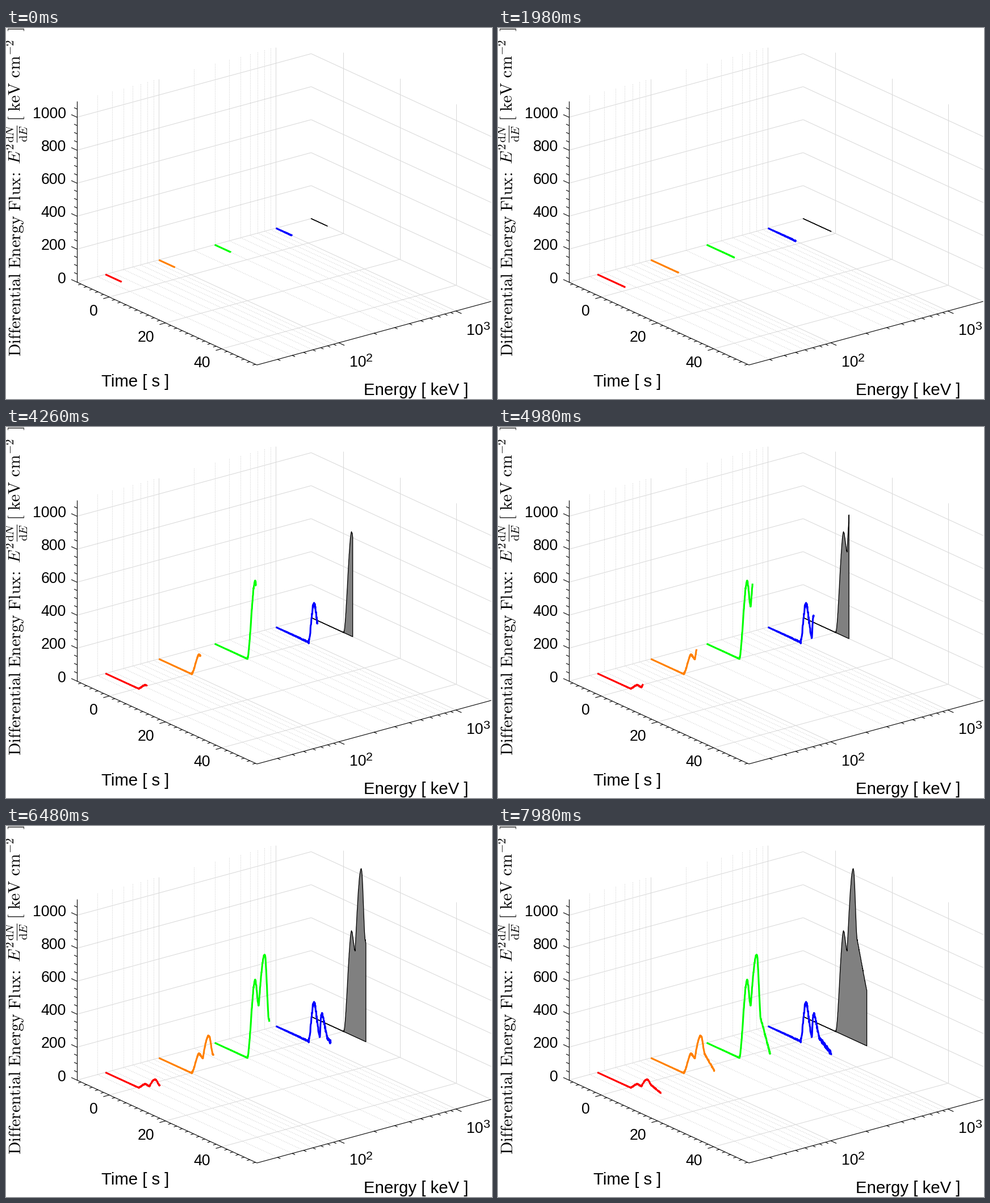
A matplotlib script for the animation above (8 s loop, 856 by 654 pixels).

```python
import numpy as np
import matplotlib.pyplot as plt
from matplotlib.animation import FuncAnimation
from matplotlib.collections import LineCollection
from matplotlib.patches import Polygon

plt.rcParams["font.family"] = "Liberation Sans"
plt.rcParams["mathtext.fontset"] = "cm"

W, H, DPI = 856, 654, 100
PT = 72 / DPI                      # points per pixel
INK, GRID, MINOR = "black", "#d8d8d8", "#c4c4c4"

# Oblique view: screen vectors of the energy and time axes, in pixels
ORIGIN = np.array([125.0, 448.0])
E_VEC = np.array([412.5, -112.0])
T_VEC = np.array([317.0, 146.0])
E_MIN, E_MAX = 20, 2000
T_MIN, T_MAX = -11.5, 52.5
Z_MAX, Z_SCALE = 1098, 0.2907
SLOPE = T_VEC[1] / T_VEC[0]

TIMES = range(0, 41, 20)
FLUXES = range(0, 1001, 200)
DECADES = [100, 1000]
BETWEEN = [m * d for d in (10, 100) for m in range(2, 10) if m * d > E_MIN]

TICK_MS, STEP_MS, LOOP_MS = 20, 60, 8000
STEP_PX, START_PX = 0.628, 28.5    # advance per step and lead at the start


def project(e, t, z=0):
    fe = np.log(e / E_MIN) / np.log(E_MAX / E_MIN)
    ft = (t - T_MIN) / (T_MAX - T_MIN)
    return ORIGIN + fe * E_VEC + ft * T_VEC - np.array([0, z * Z_SCALE])


fig = plt.figure(figsize=(W / DPI, H / DPI), dpi=DPI, facecolor="white")
ax = fig.add_axes([0, 0, 1, 1])
ax.set_xlim(0, W)
ax.set_ylim(H, 0)
ax.axis("off")


def add_lines(segments, color, width=1.0, style="solid"):
    ax.add_collection(LineCollection(
        segments, colors=color, linewidths=width * PT, linestyles=style))


def label(x, y, text, size, ha="center", rotation=0):
    ax.text(x, y, text, fontsize=size * PT, color=INK, ha=ha, va="baseline",
            rotation=rotation, rotation_mode="anchor")


def draw_grid():
    def floor_and_wall(e):
        foot = project(e, T_MIN)
        return [(foot, project(e, T_MIN, Z_MAX)), (foot, project(e, T_MAX))]

    minor = [s for e in BETWEEN for s in floor_and_wall(e)]
    major = [s for e in DECADES for s in floor_and_wall(e)]
    for t in TIMES:
        foot = project(E_MAX, t)
        major += [(foot, project(E_MAX, t, Z_MAX)), (foot, project(E_MIN, t))]
    for z in FLUXES:
        corner = project(E_MAX, T_MIN, z)
        major += [(corner, project(E_MIN, T_MIN, z)),
                  (corner, project(E_MAX, T_MAX, z))]
    add_lines(minor, MINOR, style=(0, (1, 2)))
    add_lines(major, GRID)


def draw_rulers():
    e_dir = E_VEC / np.hypot(*E_VEC)
    t_dir = T_VEC / np.hypot(*T_VEC)
    front = project(E_MIN, T_MAX)
    segs = [(ORIGIN, project(E_MIN, T_MIN, Z_MAX)), (ORIGIN, front),
            (front, project(E_MAX, T_MAX))]

    def tick(p, direction, is_major):
        segs.append((p, p + direction * (11 if is_major else 5.5)))

    for z in range(0, Z_MAX, 50):
        tick(project(E_MIN, T_MIN, z), -t_dir, z in FLUXES)
    for t in range(-10, 53, 2):
        tick(project(E_MIN, t), -e_dir, t in TIMES)
    for e in DECADES + BETWEEN:
        tick(project(e, T_MAX), t_dir, e in DECADES)
    add_lines(segs, INK, 1.1)


def draw_labels():
    size, big, tex = 26.67, 29.33, 29.8
    for z in FLUXES:
        x, y = project(E_MIN, T_MIN, z)
        label(x - 19, y + 1.5, str(z), size, "right")
    for t in TIMES:
        x, y = project(E_MIN, t)
        label(x - 20, y + 33, str(t), size, "right")
    for e in DECADES:
        x, y = project(e, T_MAX)
        label(x + 18.5, y + 42.5, "10", size, "left")
        label(x + 47.5, y + 33, f"{np.log10(e):.0f}", 0.8 * size, "left")
    label(228, 632, "Time [ s ]", big)
    label(722.5, 647, "Energy [ keV ]", big)
    for y, text in ((579, r"\mathrm{Differential\ Energy\ Flux\!:}"),
                    (240, r"E^2"),
                    (202, r"\frac{\mathrm{d}N}{\mathrm{d}E}"),
                    (164, r"["), (147, r"\mathrm{keV\ cm}^{-2}"), (6, r"]")):
        label(26, y, f"${text}$", tex, "left", 90)


# Light curves: onset, first peak, dip, second peak, knee and end, placed in
# pixels along the time axis; each stretch between them has its own easing.
def smooth(f):
    return f * f * (3 - 2 * f)


def ease_out(f):
    return np.sin(f * np.pi / 2)


def linear(f):
    return f


EASES = (smooth, smooth, ease_out, smooth, linear)
KEYS = (57, 71.3, 77.5, 88.5, 95.5, 112.5)
EARLY_KEYS = (57, 67, 77.5, 80.5, 92, 112.5)

U = np.arange(0, 113.5, STEP_PX / 2)
rng = np.random.default_rng(4)


def curve(energy, heights, quiet, active, keys=KEYS):
    height = np.zeros(U.size)
    for k, ease in enumerate(EASES):
        f = np.clip((U - keys[k]) / (keys[k + 1] - keys[k]), 0, 1)
        height += (heights[k + 1] - heights[k]) * ease(f)
    jitter = rng.uniform(-1, 1, U.size)
    jitter *= np.where(U < keys[0], quiet * U / keys[0], active)
    x0, y0 = project(energy, T_MIN)
    return np.column_stack([x0 + U, y0 + SLOPE * U - height - jitter])


draw_grid()
draw_rulers()
draw_labels()

area_pts = curve(E_MAX, (0, 183, 152, 301, 178, 95), 0.3, 1.5)
area = Polygon(area_pts[:3], closed=True, facecolor="#808080",
               edgecolor="black", linewidth=1.3 * PT, joinstyle="round",
               zorder=3)
ax.add_patch(area)

traces = []
for color, pts in (
        ("#0000ff", curve(1000, (0, 72, 19, 59, 20, 2), 1.2, 3.5, EARLY_KEYS)),
        ("#00ff00", curve(300, (0, 143, 101, 196, 86, 29), 0.3, 2)),
        ("#ff8000", curve(100, (0, 40, 35, 80, 50, 28), 0.2, 1.2)),
        ("#ff0000", curve(35, (0, 12, 11, 28, 21, 15), 0.2, 0.7))):
    line, = ax.plot([], [], color=color, lw=3.1 * PT, zorder=4,
                    solid_capstyle="butt", solid_joinstyle="round")
    traces.append((line, pts))


def update(i):
    step = i * TICK_MS // STEP_MS
    n = round(2 * START_PX / STEP_PX) + 2 * step + 1
    top = area_pts[:n]
    start = project(E_MAX, T_MIN)
    end = start + U[n - 1] * np.array([1, SLOPE])
    area.set_xy(np.vstack([top, end, start]))
    for line, pts in traces:
        line.set_data(pts[:n, 0], pts[:n, 1])
    return [area] + [line for line, _ in traces]


anim = FuncAnimation(fig, update, frames=LOOP_MS // TICK_MS,
                     interval=TICK_MS, repeat=True, repeat_delay=0)
plt.show()
```
